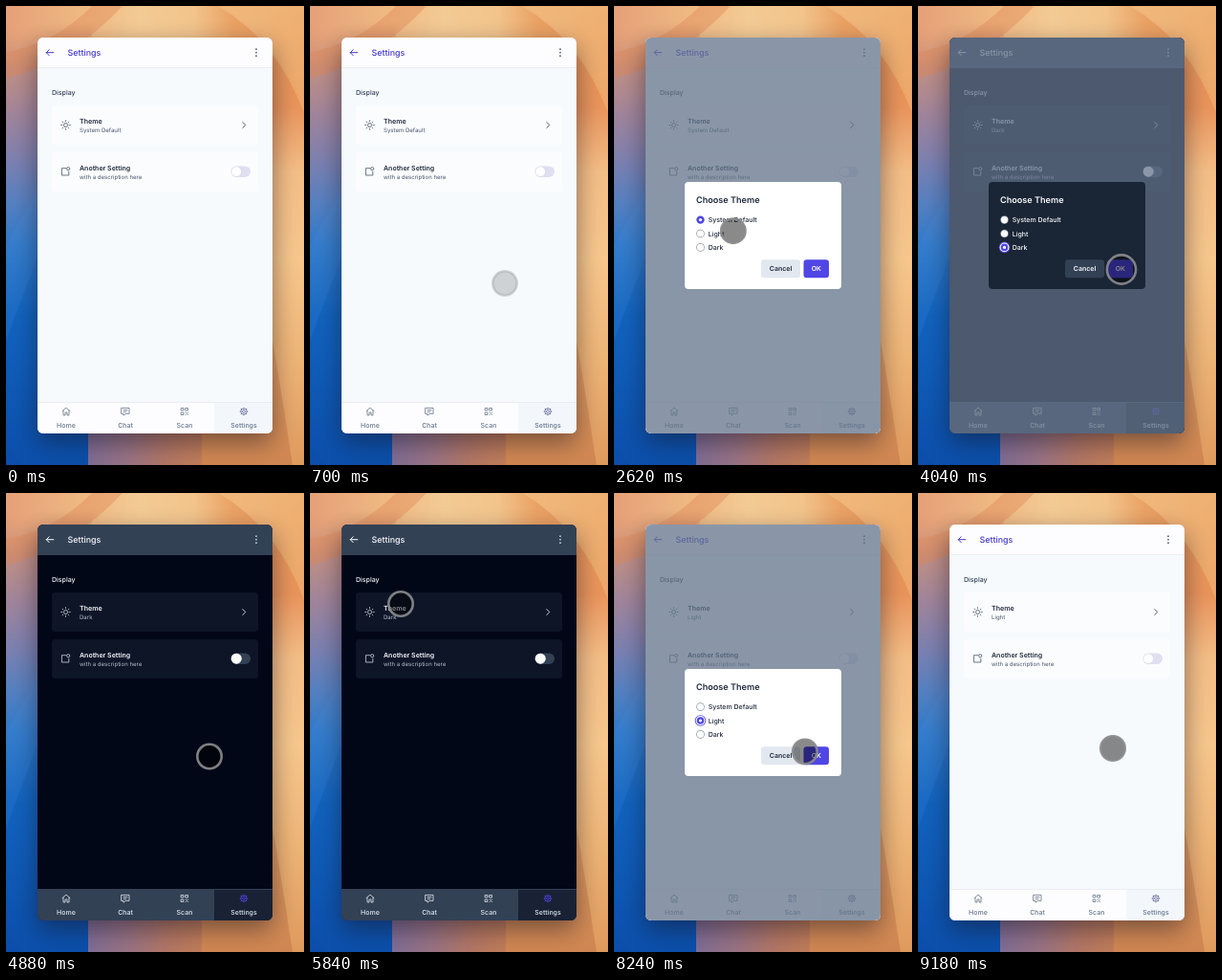
These frames come from a looping animation (312 by 480 pixels, 9.2 s). An HTML page with a canvas:

```html
<!DOCTYPE html>
<html lang="en">
<head>
<meta charset="utf-8">
<title>Theme settings</title>
<style>
html, body { margin: 0; width: 100%; height: 100%; overflow: hidden; }
canvas { display: block; width: 312px; height: 480px; }
</style>
</head>
<body>
<canvas id="stage"></canvas>
<script>
const W = 312, H = 480, LOOP = 9200;
const canvas = document.getElementById('stage');
const dpr = window.devicePixelRatio || 1;
canvas.width = W * dpr;
canvas.height = H * dpr;
const ctx = canvas.getContext('2d');

const LIGHT = {
  page: '#f6fafd', bar: '#fdfdff', line: '#e6eaf1', card: '#fbfcfe', active: '#f3f7fb',
  accent: '#4338ca', text: '#1e293b', label: '#334155', sub: '#475569', icon: '#475569',
  nav: '#64748b', gear: '#6b6f9c', track: '#dfdff0', knobEdge: '#d3d6e4',
  dialog: '#ffffff', cancel: '#e2e8f0', radioEdge: '#8b95a5'
};
const DARK = {
  page: '#020718', bar: '#334155', line: '#3d4a5e', card: '#0d1527', active: '#182234',
  accent: '#f8fafc', text: '#f8fafc', label: '#f1f5f9', sub: '#b4bfcd', icon: '#cbd5e1',
  nav: '#e2e8f0', gear: '#4f46e5', track: '#334155', knobEdge: '#ffffff',
  dialog: '#1a2535', cancel: '#334155', radioEdge: '#7b8594'
};

// [time, x, y]
const PATH = [
  [650, 204, 290], [900, 204, 290], [1450, 229, 125], [2050, 229, 125],
  [2620, 125, 235], [2880, 91, 252], [3280, 91, 252], [3800, 213, 275.5],
  [4900, 213, 275.5], [5750, 95, 116], [6450, 95, 116], [7350, 113, 238],
  [7850, 113, 238], [8350, 212, 275], [8750, 212, 275], [9180, 204, 267], [9200, 204, 267]
];
const PRESSES = [1640, 3030, 3940, 6080, 7570, 8500];
const DIALOGS = [[1840, 4090], [6250, 8640]];
const DARK_ON = 3130, DARK_OFF = 7670;

const clamp = v => Math.max(0, Math.min(1, v));
const ease = v => { v = clamp(v); return v * v * (3 - 2 * v); };

function box(x, y, w, h, r, fill) {
  ctx.beginPath();
  ctx.roundRect(x, y, w, h, r);
  ctx.fillStyle = fill;
  ctx.fill();
}

function rect(x, y, w, h, fill) {
  ctx.fillStyle = fill;
  ctx.fillRect(x, y, w, h);
}

function disc(x, y, r, fill) {
  ctx.beginPath();
  ctx.arc(x, y, r, 0, Math.PI * 2);
  ctx.fillStyle = fill;
  ctx.fill();
}

function ring(x, y, r, color, width) {
  ctx.beginPath();
  ctx.arc(x, y, r, 0, Math.PI * 2);
  ctx.strokeStyle = color;
  ctx.lineWidth = width;
  ctx.stroke();
}

function text(s, x, y, size, weight, color, align = 'left') {
  ctx.font = `${weight} ${size}px Inter, Roboto, sans-serif`;
  ctx.textRendering = 'geometricPrecision';
  ctx.textAlign = align;
  ctx.fillStyle = color;
  ctx.fillText(s, x, y);
}

function icon(d, x, y, color, width = 0.9) {
  ctx.save();
  ctx.translate(x, y);
  ctx.strokeStyle = color;
  ctx.lineWidth = width;
  ctx.lineCap = ctx.lineJoin = 'round';
  ctx.stroke(new Path2D(d));
  ctx.restore();
}

function gradient(x0, y0, x1, y1, stops) {
  const g = ctx.createLinearGradient(x0, y0, x1, y1);
  stops.forEach(([at, color]) => g.addColorStop(at, color));
  return g;
}

function shape(d, fill) {
  ctx.fillStyle = fill;
  ctx.fill(new Path2D(d));
}

function wallpaper() {
  rect(0, 0, W, H, gradient(0, 0, 0, H, [
    [0, '#e8985a'], [0.22, '#e8935a'], [0.36, '#f3bd86'], [0.55, '#f6c68c'], [0.78, '#edb274'], [1, '#de9a5c']]));
  rect(0, 0, 280, 60, gradient(0, 0, 280, 0, [
    [0, '#e5a077'], [0.25, '#eeb581'], [0.5, '#f3ca93'], [0.7, '#f2c48c'], [0.85, '#eaa163'], [1, '#e8985a']]));
  shape('M222 0 Q284 36 312 112 V0Z', gradient(230, 0, 312, 100, [[0, '#f0b87c'], [1, '#eca667']]));
  shape('M262 260 Q284 370 300 480 H200 V260Z', gradient(0, 300, 0, H, [[0, '#e9a76c'], [1, '#cf8550']]));
  shape('M0 20 L90 20 V480 H0Z', gradient(0, 20, 14, H, [
    [0, 'rgba(222,150,112,0)'], [0.1, '#c08f84'], [0.2, '#a08499'], [0.3, '#7f80ad'],
    [0.4, '#567fbf'], [0.5, '#2f78c8'], [0.66, '#1062be'], [1, '#0a4eaa']]));
  shape('M0 48 Q50 40 90 0 H122 Q70 56 0 76Z', 'rgba(222,132,84,.4)');
  shape('M0 250 L34 190 V260 L0 350Z', 'rgba(80,150,225,.14)');
  rect(86, 440, 119, 40, gradient(86, 0, 205, 0, [
    [0, '#7f6c94'], [0.35, '#987283'], [0.7, '#b27664'], [1, '#c07c58']]));
}

function navItem(label, x, c, active) {
  text(label, x, 441, 7, 500, c.nav, 'center');
  const color = active ? c.gear : c.nav;
  if (label === 'Home') icon('M-4 -.3L0 -4L4 -.3M-3 -1V4H-1V1H1V4H3V-1', x, 424, color, 0.8);
  if (label === 'Chat') icon('M-4 -3.6H4V2.4H0L-2 4.3V2.4H-4ZM-2 -1.5H2M-2 .4H1', x, 424, color, 0.8);
  if (label === 'Scan') icon('M-3.5 -3.5h2.4v2.4h-2.4ZM1.1 -3.5h2.4v2.4h-2.4ZM-3.5 1.1h2.4v2.4h-2.4ZM1.1 1.1h.6M3.3 1.1h.2M1.1 3.5h.2M3.3 3.4h.2M2.3 2.3h.2', x, 424, color, 0.8);
  if (label === 'Settings') {
    ring(x, 424, 1.4, color, 0.8);
    ring(x, 424, 3.1, color, 0.8);
    for (let i = 0; i < 8; i++) {
      const a = i * Math.PI / 4;
      disc(x + 3.7 * Math.cos(a), 424 + 3.7 * Math.sin(a), 0.65, color);
    }
  }
}

function page(c, theme) {
  rect(33, 33, 246, 414, c.page);
  rect(33, 33, 246, 31.5, c.bar);
  rect(33, 64, 246, 0.8, c.line);
  icon('M3.8 0H-3.8M-.8 -3L-3.8 0L-.8 3', 46, 48.7, c.accent, 1);
  text('Settings', 64.5, 52, 8.9, 500, c.accent);
  [-3.5, 0, 3.5].forEach(d => disc(262, 48.7 + d, 0.85, c.icon));

  text('Display', 48, 93.2, 7, 500, c.label);
  box(48, 104, 216, 41, 3.5, c.card);
  box(48, 153, 216, 41, 3.5, c.card);

  ring(62.5, 124.5, 2, c.icon, 0.8);
  for (let i = 0; i < 8; i++) {
    const a = i * Math.PI / 4, x = Math.cos(a), y = Math.sin(a);
    icon(`M${3.7 * x} ${3.7 * y}L${4.8 * x} ${4.8 * y}`, 62.5, 124.5, c.icon, 0.8);
  }
  text('Theme', 77, 123.2, 7.1, 600, c.text);
  text(theme, 77, 132.4, 6.05, 400, c.sub);
  icon('M-1.5 -3L1.5 0L-1.5 3', 249.3, 124.5, c.icon, 1);

  icon('M.5 -3.3H-3.8V4H3.6V.2', 62.2, 173, c.icon, 0.8);
  ring(65.2, 170.2, 1.6, c.icon, 0.8);
  text('Another Setting', 77, 172.2, 7, 600, c.text);
  text('with a description here', 77, 181.4, 6.05, 400, c.sub);
  box(235.5, 167.5, 20.5, 11.5, 5.75, c.track);
  disc(241.2, 173.2, 5.5, c.knobEdge);
  disc(241.2, 173.2, 5, '#fff');

  rect(33, 414.5, 246, 32.5, c.bar);
  rect(218, 414.5, 61, 32.5, c.active);
  rect(33, 414.2, 246, 0.8, c.line);
  ['Home', 'Chat', 'Scan', 'Settings'].forEach((s, i) => navItem(s, 63 + 62 * i, c, i === 3));
}

function dialog(c, theme, focus) {
  box(74, 184, 164, 112, 4, c.dialog);
  text('Choose Theme', 86, 206.3, 9.1, 600, c.text);
  ['System Default', 'Light', 'Dark'].forEach((s, i) => {
    const y = 223.6 + 14.4 * i;
    if (s === theme) {
      if (focus) {
        disc(90.5, y, 5.8, '#4f46e5');
        disc(90.5, y, 4.9, '#fff');
      }
      disc(90.5, y, focus ? 3.8 : 4.2, '#4f46e5');
      disc(90.5, y, 1.6, '#fff');
    } else {
      disc(90.5, y, 4.3, c.radioEdge);
      disc(90.5, y, 3.6, '#fff');
    }
    text(s, 98.7, y + 2.5, 7, 500, c.text);
  });
  box(154, 265.3, 41, 18.9, 3.2, c.cancel);
  text('Cancel', 174.5, 277.3, 7, 600, c.text, 'center');
  box(198.5, 265.3, 26.5, 18.9, 3.2, '#4f46e5');
  text('OK', 211.8, 277.3, 7, 600, '#fff', 'center');
}

// Hermite path that comes to rest wherever two neighbours share a place.
function cursorAt(t) {
  let i = 0;
  while (i < PATH.length - 2 && t >= PATH[i + 1][0]) i++;
  const a = PATH[i], b = PATH[i + 1], span = b[0] - a[0];
  const u = clamp((t - a[0]) / span);
  const slope = (k, axis) => {
    const p = PATH[k - 1], q = PATH[k], n = PATH[k + 1];
    if (!p || !n) return 0;
    const still = (m, o) => m[1] === o[1] && m[2] === o[2];
    return still(p, q) || still(q, n) ? 0 : (n[axis] - p[axis]) / (n[0] - p[0]);
  };
  return [1, 2].map(k => {
    const e = u * u * (3 - 2 * u);
    return a[k] + (b[k] - a[k]) * e
      + slope(i, k) * span * u * (1 - u) ** 2
      - slope(i + 1, k) * span * u * u * (1 - u);
  });
}

function cursor(t) {
  const alpha = clamp((t - 650) / 150);
  if (!alpha) return;
  const [x, y] = cursorAt(t);
  let r = 14;
  PRESSES.forEach(p => {
    const d = t - p;
    r -= 2.7 * ease((d + 90) / 80) * (1 - ease((d - 30) / 50));
    r += 2.4 * ease((d - 50) / 50) * (1 - ease((d - 110) / 110));
  });
  ctx.globalAlpha = alpha;
  disc(x, y, r - 1.3, 'rgba(0,0,0,.46)');
  ring(x, y, r - 1.3, 'rgba(138,138,140,.92)', 2.6);
  ctx.globalAlpha = 1;
}

function draw(t) {
  const dark = t >= DARK_ON && t < DARK_OFF;
  const c = dark ? DARK : LIGHT;
  const theme = dark ? 'Dark' : t < DARK_ON ? 'System Default' : 'Light';
  ctx.setTransform(dpr, 0, 0, dpr, 0, 0);
  wallpaper();

  ctx.shadowColor = 'rgba(20,15,30,.5)';
  ctx.shadowBlur = 26 * dpr;
  ctx.shadowOffsetY = 9 * dpr;
  box(33, 33, 246, 414, 6, '#64748b');
  ctx.shadowColor = 'transparent';

  ctx.save();
  ctx.beginPath();
  ctx.roundRect(33, 33, 246, 414, 6);
  ctx.clip();
  page(c, theme);
  const open = Math.max(...DIALOGS.map(([on, off]) =>
    Math.min(ease((t - on) / 140), 1 - ease((t - off) / 120))));
  if (open > 0) {
    ctx.globalAlpha = open;
    rect(33, 33, 246, 414, 'rgba(100,116,139,.75)');
    const s = 0.95 + 0.05 * open;
    ctx.translate(156, 240);
    ctx.scale(s, s);
    ctx.translate(-156, -240);
    const focus = (t >= DARK_ON && t < 5000) || t >= DARK_OFF;
    dialog(c, theme, focus);
  }
  ctx.restore();
  cursor(t);
}

const start = performance.now();
function tick() {
  draw((performance.now() - start) % LOOP);
  requestAnimationFrame(tick);
}
tick();
</script>
</body>
</html>
```
